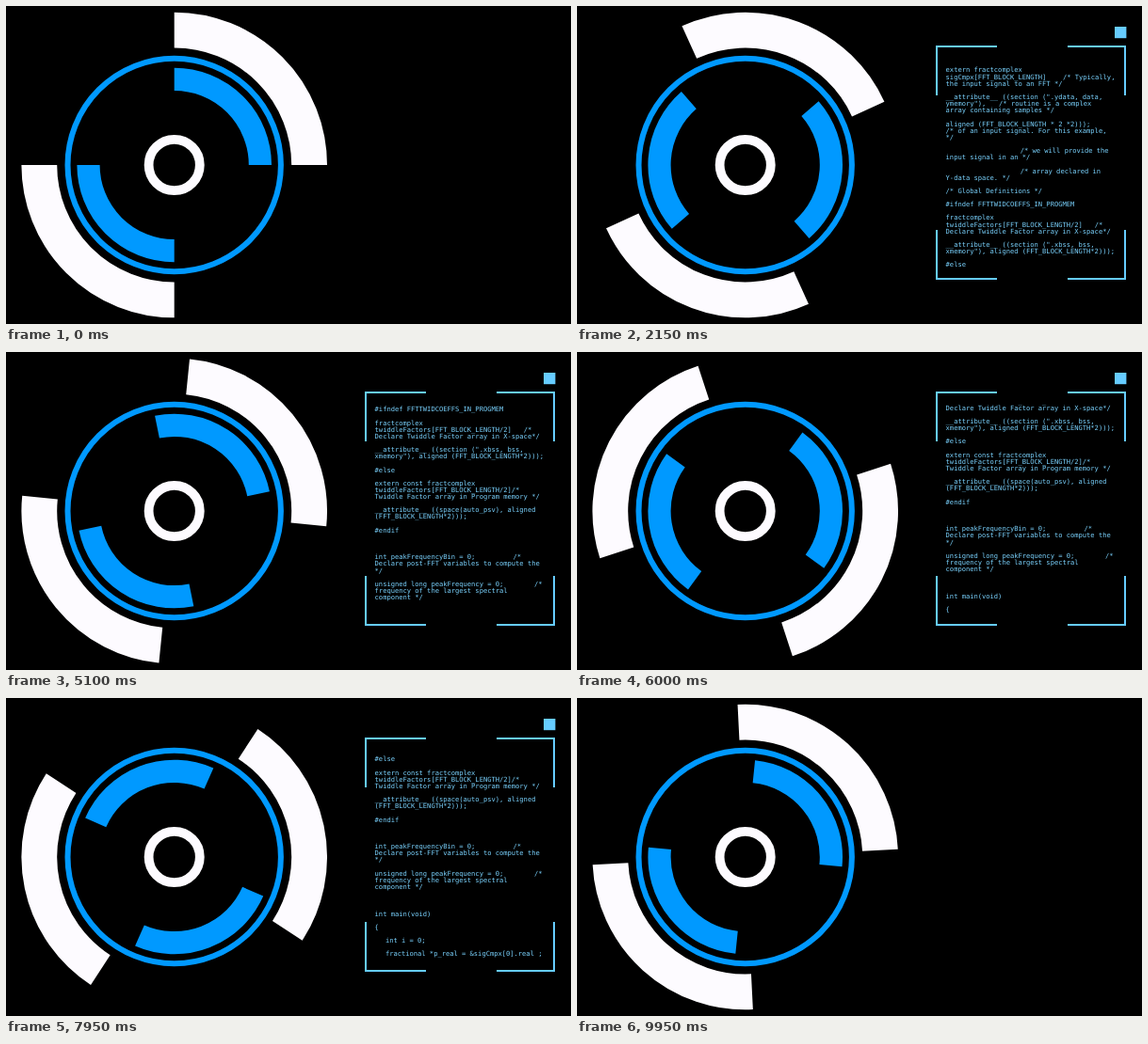
An HTML page for the animation above (10 s loop, 600 px wide and 338 px high).

```html
<!DOCTYPE html>
<html lang="en">
<head>
<meta charset="utf-8">
<title>HUD dial</title>
<style>
  html, body { margin: 0; width: 100%; height: 100%; overflow: hidden; background: #000; }
  svg { display: block; width: 100vw; height: 100vh; }
  .dial { fill: none; stroke: #fdfbff; }
  .dial .blue { stroke: #0099ff; }
  .frame { fill: none; stroke: #66ccff; stroke-width: 2; }
  #lamp { fill: #66ccff; }
  #code { fill: #7ad3ff; font: 7.1px "DejaVu Sans Mono", monospace; white-space: pre; }
</style>
</head>
<body>
<svg viewBox="0 0 600 338">
  <clipPath id="view"><rect x="384" y="56" width="198" height="225"/></clipPath>
  <g class="dial" transform="translate(178.7 169)">
    <path id="outer" stroke-width="37.8"/>
    <circle class="blue" r="113.2" stroke-width="6"/>
    <path id="inner" class="blue" stroke-width="24.2"/>
    <circle r="27.1" stroke-width="9.8"/>
  </g>
  <g id="panel" opacity="0">
    <path class="frame" d="M382 95V43H446M521 43H582V95M382 238V290H446M521 290H582V238"/>
    <rect id="lamp" x="571" y="22" width="12.4" height="12.2"/>
    <g clip-path="url(#view)"><g id="code"></g></g>
  </g>
</svg>
<script>
const LOOP = 10000, STEP = 50, FILM_FRAME = 40;
const LEFT = 391.6, TOP = 70.4, LINE = 7.14, TAB = 11.3;

// ~n~ moves the rest of the line to tab stop n
const listing = `extern fractcomplex
sigCmpx[FFT_BLOCK_LENGTH]~11~/* Typically,
the input signal to an FFT  */

__attribute__ ((section (".ydata, data,
ymemory"),~5~/* routine is a complex
array containing samples */

aligned (FFT_BLOCK_LENGTH * 2 *2)));
/* of an input signal. For this example,
*/

~7~/* we will provide the
input signal in an */

~7~/* array declared in
Y-data space. */

/* Global Definitions */

#ifndef FFTTWIDCOEFFS_IN_PROGMEM

fractcomplex
twiddleFactors[FFT_BLOCK_LENGTH/2]~14~/*
Declare Twiddle Factor array in X-space*/

__attribute__ ((section (".xbss, bss,
xmemory"), aligned (FFT_BLOCK_LENGTH*2)));

#else

extern const fractcomplex
twiddleFactors[FFT_BLOCK_LENGTH/2]/*
Twiddle Factor array in Program memory */

__attribute__ ((space(auto_psv), aligned
(FFT_BLOCK_LENGTH*2)));

#endif



int  peakFrequencyBin = 0;~13~/*
Declare post-FFT variables to compute the
*/

unsigned long peakFrequency = 0;~15~/*
frequency of the largest spectral
component */



int main(void)

{

~1~int i = 0;

~1~fractional *p_real = &sigCmpx[0].real ;`;

const el = id => document.getElementById(id);
const [outer, inner, panel, lamp, code] = ['outer', 'inner', 'panel', 'lamp', 'code'].map(el);

const quarters = r => `M0 ${-r}A${r} ${r} 0 0 1 ${r} 0M0 ${r}A${r} ${r} 0 0 1 ${-r} 0`;
outer.setAttribute('d', quarters(143.4));
inner.setAttribute('d', quarters(91.2));

function addText(str, x, y) {
  const node = document.createElementNS('http://www.w3.org/2000/svg', 'text');
  node.setAttribute('x', x);
  node.setAttribute('y', y);
  node.textContent = str;
  code.append(node);
}

listing.split('\n').forEach((line, row) => {
  const parts = line.split('~');
  for (let i = 0; i < parts.length; i += 2) {
    const stop = i ? +parts[i - 1] : 0;
    if (parts[i]) addText(parts[i], LEFT + stop * TAB, TOP + row * LINE);
  }
});

const ramp = (t, from, to) => Math.min(1, Math.max(0, (t - from) / (to - from)));
const ease = p => p * p * (3 - 2 * p);

function draw(now) {
  // 25 fps film sampled at 20 fps
  const tick = Math.floor((now % LOOP) / STEP);
  const film = Math.ceil(tick * STEP / FILM_FRAME - 0.5);
  const t = film * FILM_FRAME;

  outer.setAttribute('transform', `rotate(${film * 2.88})`);
  inner.setAttribute('transform', `rotate(${film * -5.76})`);

  const lines = 21 * ease(ramp(t, 4000, 4750)) + 8.42 * ease(ramp(t, 5600, 6400));
  code.setAttribute('transform', `translate(0 ${-lines * LINE})`);
  panel.setAttribute('opacity', ramp(t, 400, 700) * (1 - ramp(t, 9550, 9800)));
  lamp.setAttribute('visibility', (t + 250) % 1000 < 500 ? 'visible' : 'hidden');
}

function loop(now) {
  draw(now);
  requestAnimationFrame(loop);
}
draw(0);
requestAnimationFrame(loop);
</script>
</body>
</html>
```
